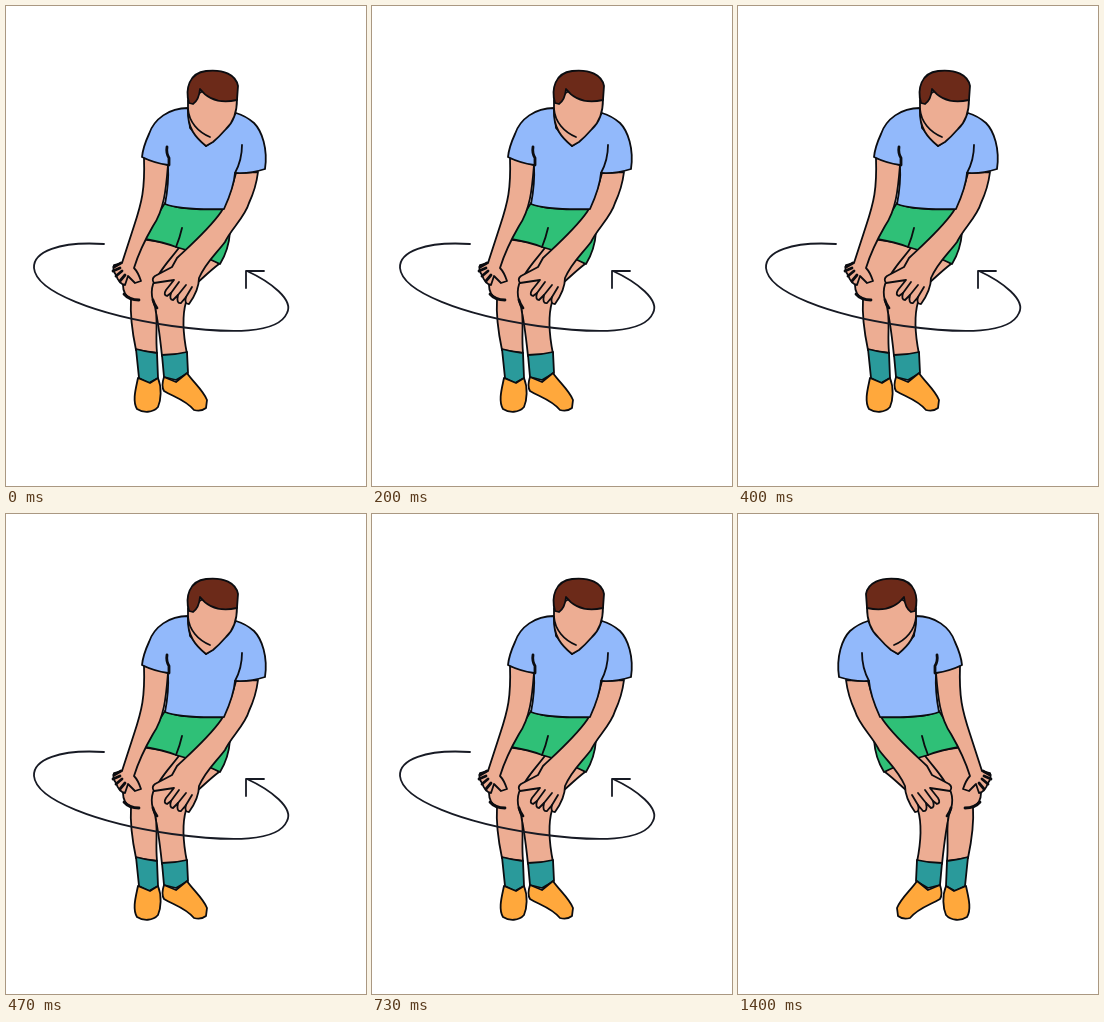
An HTML page for the animation above (2.67 s loop, 360 by 480 pixels).

```html
<!DOCTYPE html>
<html lang="en">
<head>
<meta charset="utf-8">
<title>Knee circles</title>
<style>
  html, body { margin: 0; width: 100%; height: 100%; overflow: hidden; background: #fff; }
  svg { display: block; width: 100%; height: 100%; }
  path { stroke: #0b0c10; stroke-width: 1.8; stroke-linecap: round; stroke-linejoin: round; fill: none; }
  .skin { fill: #edad93; }
  .shirt { fill: #92b9fb; }
  .shorts { fill: #2fc077; }
  .sock { fill: #2a9a9b; }
  .shoe { fill: #ffa83c; }
  .hair { fill: #6c2a19; }
  .bold { stroke-width: 2.8; }
  #arrow path { stroke: #171a24; }
</style>
</head>
<body>
<svg viewBox="0 0 360 480">
  <g id="person">
    <!-- legs -->
    <path class="skin" d="M172 239C190 247 207 252 213 258C205 264 199 270 191 277L180 296C176 310 177 328 181 348L156 350C154 331 152 312 148 298C142 286 145 276 153 268Z"/>
    <path class="skin" d="M136 233L175 239C168 249 159 258 153 268C146 276 144 287 148 298C153 309 149 326 151 347L130 344C126 325 124 309 125 293Q117 289 117 279L125 256Z"/>
    <path class="sock" d="M130 343Q140 346 151 347L152 372L143 377L133 372Z"/>
    <path class="sock" d="M156 349Q169 349 181 346L182 367L170 374L158 371Z"/>
    <path class="shoe" d="M132 372L144 377L152 372C156 382 155 394 152 401C147 407 137 407 131 403C126 395 130 382 132 372Z"/>
    <path class="shoe" d="M158 371L170 376L181 367C187 376 197 384 201 394L200 402Q195 406 188 404C180 394 168 391 158 385Q155 380 158 371Z"/>
    <!-- shorts -->
    <path class="shorts" d="M159 197Q174 205 218 203L224 226C223 240 219 250 214 258L201 252L187 246L170 241Q157 236 139 233C145 220 151 209 159 197Z"/>
    <path d="M176 222Q174 231 170 241"/>
    <!-- arms -->
    <path class="skin" d="M138 152C139 183 136 196 128 220L116 257L108 259Q106 264 110 269Q113 278 119 279L122 270L129 277L135 275Q132 266 128 262C132 249 136 239 147 220C158 204 160 184 162 159Z"/>
    <path class="bold" d="M115 257L108 261M114 262L107 265M116 265L110 270M119 269L114 275"/>
    <path class="skin" d="M230 167C225 185 221 197 215 206C204 222 187 237 171 252L166 261L149 270Q145 273 148 277L168 274L160 284Q157 289 161 290L165 287Q163 294 167 294L172 289Q170 298 175 297L180 291Q178 298 183 298C188 291 193 282 193 272C200 256 210 248 219 236C225 223 239 211 243 197Q250 182 252 166Z"/>
    <path d="M173 276L165 287M180 279L172 289M186 281L180 291"/>
    <!-- torso -->
    <path class="shirt" d="M182 102C163 102 148 113 143 128Q137 141 136 151Q148 157 162 159Q163 178 159 198Q174 204 218 203C223 192 228 180 229 167Q244 168 259 163C262 143 256 125 248 117Q240 110 230 107L206 136L200 140L184 122Z"/>
    <path class="bold" d="M161 141Q160 147 163 152L163 159"/>
    <path d="M236 139Q236 154 229 167"/>
    <!-- neck and head -->
    <path class="skin" d="M182 94V104C181 122 190 132 200 140L207 136Q213 131 220 123Q231 113 231 93L205 80Z"/>
    <path d="M182 103C183 116 192 126 204 131"/>
    <path class="hair" d="M183 97C179 83 183 67 200 65C218 63 230 69 232 80L231 94C217 97 203 95 194 83Q193 94 187 98Z"/>
    <!-- knees -->
    <path class="bold" d="M118 288Q123 294 133 294M147 294Q148 298 151 302"/>
  </g>
  <g id="arrow">
    <path d="M98 238C53 235 27 246 28 262C30 286 91 309 166 320C226 328 272 328 281 307C288 294 265 276 241 265M240 282V265H258"/>
  </g>
</svg>
<script>
  const LOOP = 2670, SWITCH = 1330;
  const person = document.getElementById('person');
  const arrow = document.getElementById('arrow');

  function draw(now) {
    const mirrored = now % LOOP >= SWITCH;
    person.setAttribute('transform', mirrored ? 'translate(360) scale(-1 1)' : '');
    arrow.setAttribute('visibility', mirrored ? 'hidden' : 'visible');
    requestAnimationFrame(draw);
  }
  draw(performance.now());
</script>
</body>
</html>
```
